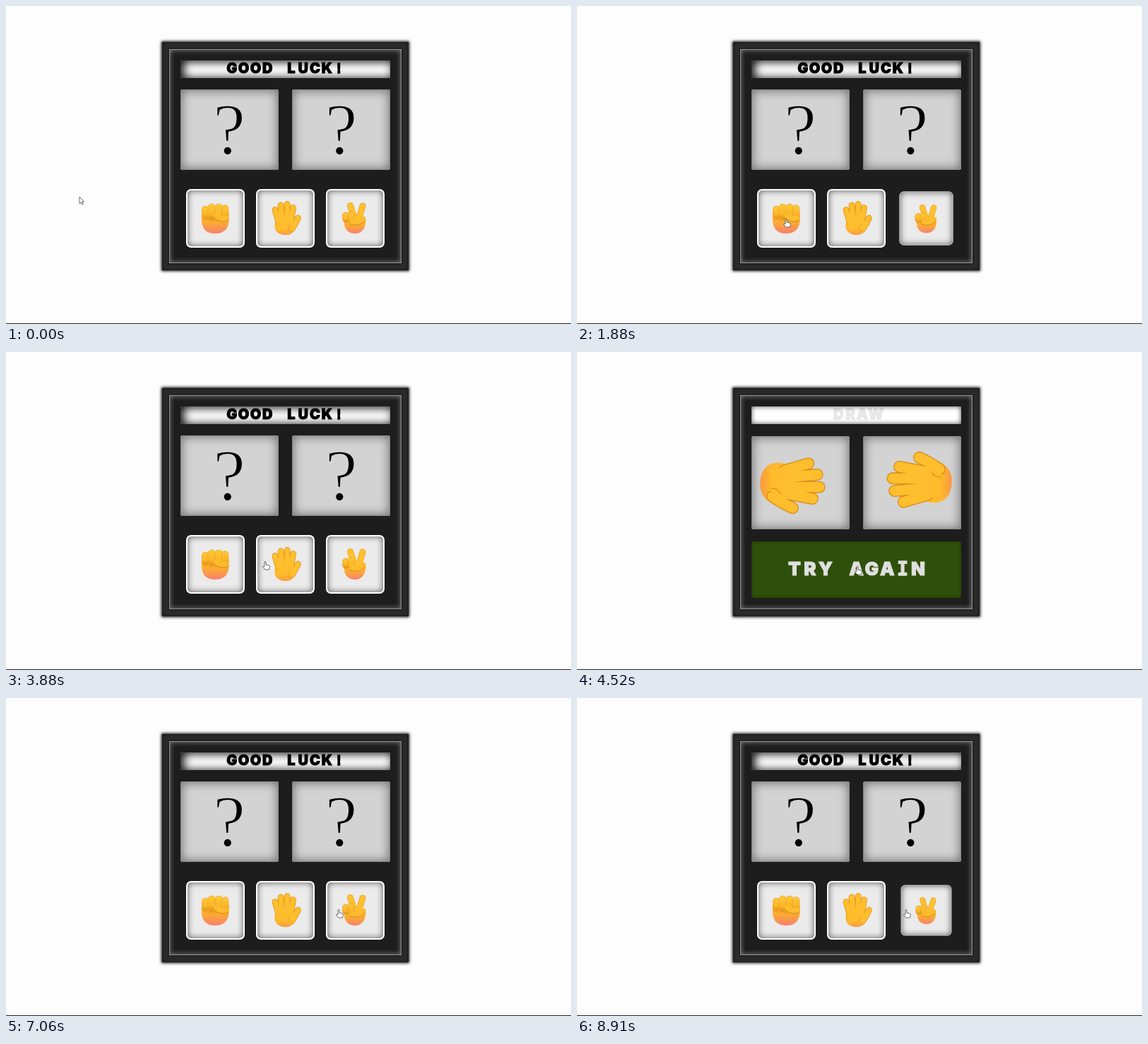
Write an HTML page that moves like this. It is 800 px wide and 450 px high and loops after 9 s.

```html
<!DOCTYPE html>
<html lang="en">
<head>
<meta charset="utf-8">
<title>Hand game</title>
<style>
html, body { margin: 0; width: 100%; height: 100%; overflow: hidden; background: #fdfdfd; }
#stage { position: absolute; left: 0; top: 0; width: 800px; height: 450px; overflow: hidden; }
#stage div, svg { position: absolute; box-sizing: border-box; }
#stage > svg { left: 0; top: 0; }
#floor { left: 0; top: 449px; width: 800px; height: 1px; background: #222; }
#frame { left: 221px; top: 51px; width: 349px; height: 323px; background: #2b2b2b;
  box-shadow: 0 0 4px 1px #000, inset 0 0 4px #111; }
#inner { left: 231px; top: 61px; width: 329px; height: 303px; background: #1d1d1d; border: 1px solid #929292;
  box-shadow: 0 0 3px #000, inset 0 0 6px 1px #707070; }
#title { left: 247px; top: 77px; width: 297px; height: 25px; background: #fff; border-radius: 2px;
  box-shadow: inset 4px 1px 13px 1px #111; font-size: 20px; line-height: 22px; -webkit-text-stroke: .9px; }
.result #title { box-shadow: inset 0 0 7px #444; }
.panel { top: 118px; width: 139px; height: 114px; background: #d3d3d3; border: 1px solid #888;
  border-radius: 2px; box-shadow: inset 0 0 15px #666; }
.result .panel { top: 119px; height: 132px; }
.button { top: 258.5px; width: 83px; height: 83px; background: #ebebeb; border: 2px solid #fff; border-radius: 7px;
  box-shadow: inset 0 0 10px #555; }
.button svg { left: 50%; top: 50%; margin: -42px; }
#again { left: 247px; top: 268px; width: 297px; height: 80px; background: #2f500a; border-radius: 3px;
  box-shadow: inset 0 0 4px #1c3304; color: #dfdfdf; font-size: 26px; line-height: 78px; -webkit-text-stroke: 1px; }
.mono { font-family: Inter, "DejaVu Sans", sans-serif; font-weight: 900; text-align: center; white-space: nowrap; }
.mono span { display: inline-block; width: .842em; text-align: center; white-space: pre; }
.mono .slab { font-family: "DejaVu Sans Mono", monospace; font-weight: 700; -webkit-text-stroke: 1.4px; }
.result .idle, #stage:not(.result) .done { display: none; }
/* the panel-coloured outline slims the glyph */
.mark { font: 104px "Liberation Serif", "Times New Roman", serif; stroke: #d3d3d3; stroke-width: 2px; }
</style>
</head>
<body>
<div id="stage">
  <div id="floor"></div>
  <div id="frame"></div>
  <div id="inner"></div>
  <div id="title" class="mono"></div>
  <div class="panel" style="left:247px"></div>
  <div class="panel" style="left:405px"></div>
  <div class="button idle" style="left:254.7px"><svg width="84" height="84" viewBox="-42 -42 84 84"><use href="#hand0"/></svg></div>
  <div class="button idle" style="left:353.6px"><svg width="84" height="84" viewBox="-42 -42 84 84"><use href="#hand1"/></svg></div>
  <div class="button idle" style="left:452.5px"><svg width="84" height="84" viewBox="-42 -42 84 84"><use href="#hand2"/></svg></div>
  <div id="again" class="mono done"></div>
  <svg width="800" height="450">
    <defs>
      <linearGradient id="skin" x1="0" y1="0" x2="0" y2="1">
        <stop offset="0" stop-color="#fdbc2c"/><stop offset=".5" stop-color="#fbab32"/><stop offset="1" stop-color="#f98070"/>
      </linearGradient>
      <linearGradient id="palm" x1="0" y1="0" x2="0" y2="1">
        <stop offset="0" stop-color="#ffc02d"/><stop offset=".7" stop-color="#fdb42c"/><stop offset="1" stop-color="#fa9848"/>
      </linearGradient>
      <linearGradient id="finger" x1="0" y1="0" x2="0" y2="1">
        <stop offset="0" stop-color="#ffc936"/><stop offset=".65" stop-color="#fcb629"/><stop offset="1" stop-color="#e0921c"/>
      </linearGradient>
      <g id="hand0">
        <path d="M-18.5-10C-21 10-17 22 0 22S22 10 19-10Z" fill="url(#skin)"/>
        <path d="M-16 1Q0 6 18 0" fill="none" stroke="#dd841c" stroke-width="3" opacity=".3"/>
        <g fill="url(#finger)" stroke="#dd941c" stroke-width=".5">
          <rect x="-18.5" y="-17" width="9.5" height="18" rx="4.7"/>
          <rect x="-10" y="-20" width="10.5" height="22" rx="5"/>
          <rect x="0" y="-20" width="10.5" height="22" rx="5"/>
          <rect x="9.5" y="-18.5" width="9.5" height="19" rx="4.7"/>
        </g>
        <path d="M15 1Q9 3 2-2" fill="none" stroke="#dc8f19" stroke-width="8.6" stroke-linecap="round"/>
        <path d="M15 0Q9 2 2-3" fill="none" stroke="#fdbb2d" stroke-width="8" stroke-linecap="round"/>
      </g>
      <g id="hand1" stroke-linecap="round" fill="none">
        <path d="M-13 3C-18 16-11 24 1 24C11 24 15 17 18 9L11 1Z" fill="url(#palm)"/>
        <path d="M-9 6L-14-11.5M-4 3L-6-18M3 3L3.2-19.5M8 5L11.7-14.5M10 15Q15 8 18.5 0" stroke="#d98d18" stroke-width="8.8"/>
        <path d="M-9 6L-14-11.5M-4 3L-6-18M3 3L3.2-19.5M8 5L11.7-14.5M10 15Q15 8 18.5 0" stroke="#ffbe2d" stroke-width="7.4"/>
        <path d="M-12 5Q0-1 11 5L8 16H-9Z" fill="#ffbd2d"/>
        <path d="M8 9Q4 11 4 16" stroke="#e99a26" stroke-width="1"/>
      </g>
      <g id="hand2" stroke-linecap="round" fill="none">
        <path d="M-15 0C-17 14-11 22 0 22S17 12 15-2Z" fill="url(#skin)"/>
        <path d="M-1 0L-6.5-17.5M6 0L11-17" stroke="#df9420" stroke-width="9"/>
        <path d="M-1 0L-6.5-17.5M6 0L11-17" stroke="#ffc02f" stroke-width="8"/>
        <g fill="url(#finger)" stroke="#dc901c" stroke-width=".6">
          <rect x="-17.5" y="-8" width="9" height="14" rx="4.5"/>
          <rect x="-10" y="-9" width="9" height="16" rx="4.5"/>
        </g>
        <path d="M10 3Q5 8-4 6" stroke="#dd8f1b" stroke-width="8"/>
        <path d="M10 2Q5 7-4 5" stroke="#fdbb2d" stroke-width="7.5"/>
      </g>
    </defs>
    <g class="mark idle" text-anchor="middle"><text x="316" y="209.5">?</text><text x="474.5" y="209.5">?</text></g>
    <g class="done">
      <use class="pick" transform="translate(305.5 185) rotate(90) scale(1.93)"/>
      <use class="pick" transform="translate(484.5 185) rotate(-90) scale(1.93)"/>
    </g>
    <g id="cursor" fill="#fff" stroke="#444" stroke-width=".8" stroke-linejoin="round">
      <path id="arrow" d="M0 0V9.5L2.2 7.6L3.7 11L5.3 10.3L3.8 7H6.5Z"/>
      <path id="pointer" d="M-1 1Q0-.6 1 1V5L5.5 6Q6.7 6.5 6.3 8.5L5.3 12H-.2L-3.6 8Q-3.2 6.2-1 7.7Z"/>
    </g>
  </svg>
</div>
<script>
const $ = s => document.querySelector(s), all = s => [...document.querySelectorAll(s)];
const LOOP = 9000, LAST = 8910;
// click on a hand, click on "try again", chosen hand
const rounds = [[1910, 3760, 0], [4360, 5220, 1], [5820, 6760, 1], [7520, 8450, 2]];
// button, start of its pulse
const pulses = [[0, 1000], [1, 1300], [2, 1600], [2, 8820]];
const PULSE = 330;
// time, x, y of the cursor tip
const path = [
  [30, 104, 270], [250, 300, 89], [430, 446, 200], [610, 445, 318], [1000, 445, 318],
  [1200, 470, 308], [1750, 296, 301], [1950, 296, 301], [2400, 331, 301], [2820, 331, 301],
  [3200, 345, 200], [3650, 352, 299], [3760, 360, 297], [3880, 367, 296], [4180, 397, 303],
  [6760, 397, 303], [7060, 471, 299], [7360, 480, 302], [8450, 480, 302], [8800, 466, 299]
];
const clamp = v => Math.max(0, Math.min(1, v));
const smooth = v => v * v * (3 - 2 * v);

function write(el, text) {
  if (el.dataset.text === text) return;
  el.dataset.text = text;
  el.innerHTML = [...text].map(c => `<span${"I!".includes(c) ? ' class="slab"' : ""}>${c}</span>`).join("");
}

function cursorAt(t) {
  const i = path.findIndex(k => k[0] > t);
  if (i < 1) return (i ? path[path.length - 1] : path[0]).slice(1);
  const a = path[i - 1], b = path[i], p = smooth((t - a[0]) / (b[0] - a[0]));
  return [a[1] + (b[1] - a[1]) * p, a[2] + (b[2] - a[2]) * p];
}

function draw(t) {
  const round = rounds.find(r => t >= r[0] && t < r[1]);
  $("#stage").classList.toggle("result", !!round);
  write($("#title"), round ? "DRAW" : "GOOD LUCK!");
  const shown = round ? clamp((t - round[0]) / 850) ** 1.5 : 1;
  $("#title").style.color = `rgba(0,0,0,${shown})`;
  if (round) all(".pick").forEach(u => u.setAttribute("href", "#hand" + round[2]));

  all(".button").forEach((b, i) => {
    const beat = pulses.reduce((v, [n, start]) =>
      n === i ? Math.max(v, Math.sin(Math.PI * clamp((t - start) / PULSE))) : v, 0);
    const flat = clamp(beat * 2.5), grey = 255 - 75 * flat;
    b.style.transform = `scale(${1 - .175 * beat})`;
    b.style.borderColor = `rgb(${grey},${grey},${grey})`;
    b.style.borderWidth = 2 - flat + "px";
  });

  const [x, y] = cursorAt(t);
  const over = round
    ? x > 247 && x < 544 && y > 268 && y < 348
    : y > 258 && y < 342 && [254, 353, 452].some(l => x > l && x < l + 84);
  $("#cursor").setAttribute("transform", `translate(${x} ${y})`);
  $("#arrow").style.display = over ? "none" : "";
  $("#pointer").style.display = over ? "" : "none";
}

write($("#again"), "TRY AGAIN");
const begin = performance.now();
function tick() {
  draw(Math.min((performance.now() - begin) % LOOP, LAST));
  requestAnimationFrame(tick);
}
tick();
</script>
</body>
</html>
```
